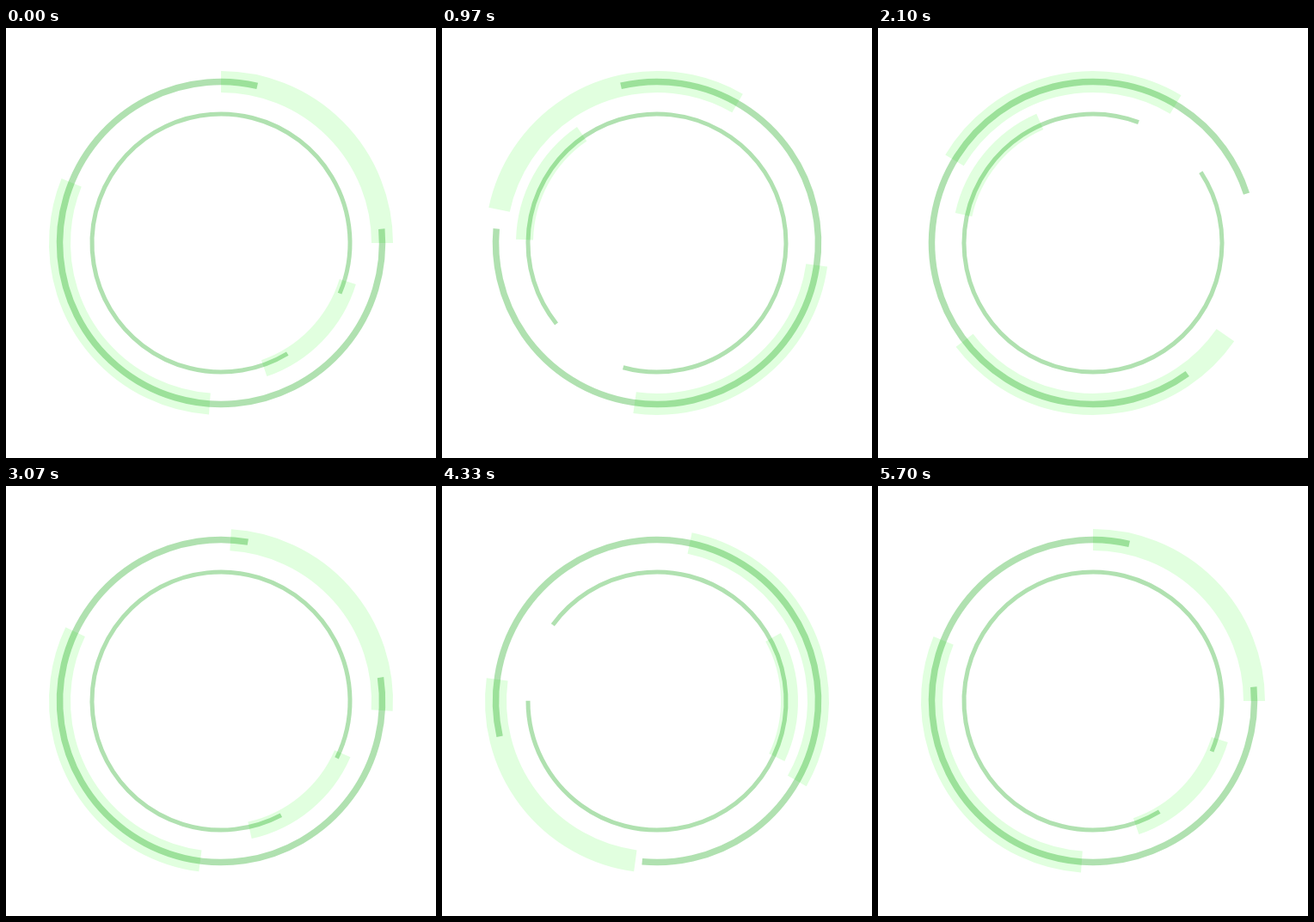
These frames come from a looping animation (500x500 px, 5730 ms). An HTML page with a canvas:

```html
<!DOCTYPE html>
<html lang="en">
<head>
<meta charset="utf-8">
<title>Rotating rings</title>
<style>
  html, body { margin: 0; width: 100%; height: 100%; overflow: hidden; background: #fff; }
  canvas { display: block; width: 100vw; height: 100vh; }
</style>
</head>
<body>
<canvas id="stage" width="500" height="500"></canvas>
<script>
const ctx = document.getElementById('stage').getContext('2d');
const LOOP = 5730;   // two turns
const TICK = 100 / 3;
const STEP = 80;     // one pose
const POSES = 36;    // poses per turn; the last equals the first
const BAND = 'rgb(225,255,223)';
const RING = 'rgba(0,158,0,0.31)';

// y of a cubic Bezier ease with control points (x1,0) and (x2,1)
function ease(x, x1, x2) {
  let lo = 0, hi = 1;
  for (let i = 0; i < 40; i++) {
    const s = (lo + hi) / 2, r = 1 - s;
    if (3 * r * r * s * x1 + 3 * r * s * s * x2 + s * s * s < x) lo = s;
    else hi = s;
  }
  return lo * lo * (3 - 2 * lo);
}

// angles in degrees, clockwise from the right
function arc(radius, width, color, start, sweep) {
  const rad = Math.PI / 180;
  ctx.beginPath();
  ctx.arc(250, 250, radius, start * rad, (start + sweep) * rad);
  ctx.lineWidth = width;
  ctx.strokeStyle = color;
  ctx.stroke();
}

function draw(time) {
  const tick = Math.floor((time % LOOP + 5) / TICK);
  const pose = Math.floor(tick * TICK / STEP + 1e-6) % POSES;
  const p = pose / (POSES - 1);
  const outer = 360 * ease(p, 1 / 3, 2 / 3);
  const inner = 360 * ease(p, 1 / 3, 5 / 6);

  ctx.fillStyle = '#fff';
  ctx.fillRect(0, 0, 500, 500);
  arc(187.5, 25, BAND, -90 + outer, 90);
  arc(187.5, 25, BAND, 94 + outer, 108);
  arc(154, 20, BAND, 17 + 2 * inner, 54);
  arc(187.5, 7.5, RING, -5 - outer, 288);
  arc(150, 5, RING, 59 + inner, 324);
}

const begin = performance.now();
function frame() {
  draw(performance.now() - begin);
  requestAnimationFrame(frame);
}
frame();
</script>
</body>
</html>
```
